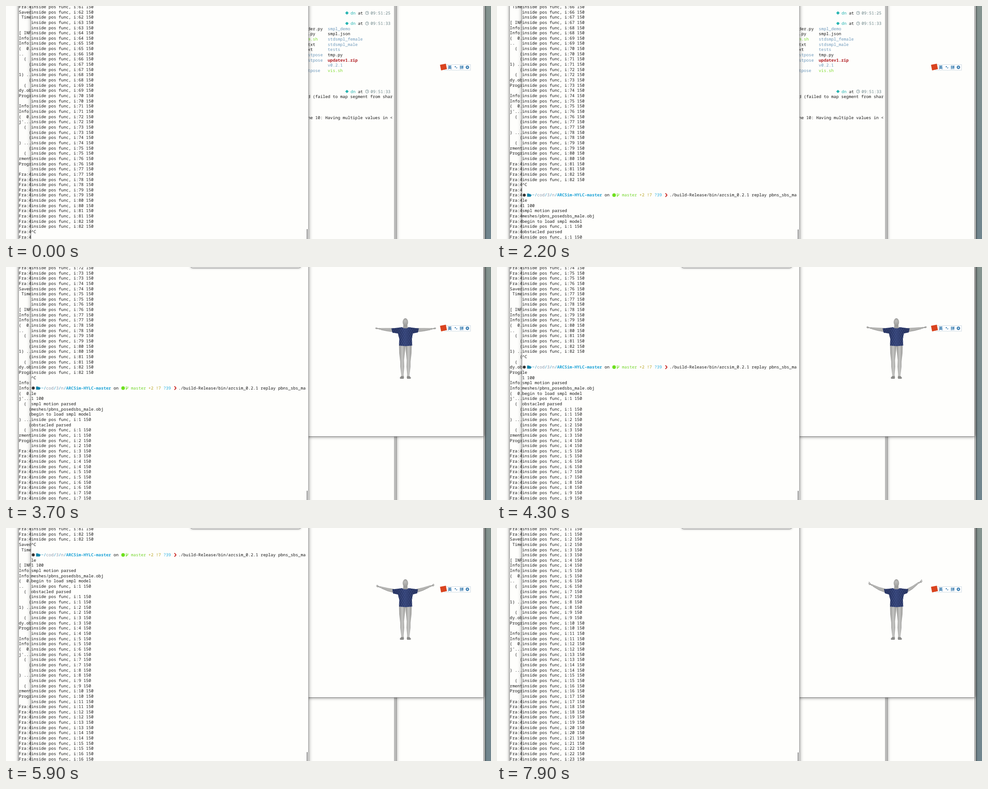
An HTML page with a canvas that plays this animation: 1079x519 px, repeating every 8000 ms.

```html
<!DOCTYPE html>
<html lang="en">
<head>
<meta charset="utf-8">
<title>Terminal replay</title>
<style>
html, body { margin: 0; width: 100%; height: 100%; overflow: hidden; background: #fefefc; }
canvas { display: block; width: 1079px; height: 519px; }
</style>
</head>
<body>
<canvas id="stage" width="1079" height="519"></canvas>
<script>
const ctx = document.getElementById('stage').getContext('2d');
const LOOP = 8000, COL = 5.55, ROW = 11.655, PAPER = '#fefefc', INK = '#161616';
const BLUE = '#6c98bb', GREEN = '#7ddc2c', TEAL = '#24b3b0', SLATE = '#6b8488';
const MONO = '9.25px "Noto Sans Mono", "DejaVu Sans Mono", monospace';

// Times (in 100 ms) at which the front terminal scrolls up one line.
const SCROLLS = [7, 10, 12, 14, 20, 20, 22, 22, 22, 23, 24, 25, 27, 28, 29, 30, 31, 32, 34, 35, 36, 37,
  39, 40, 42, 43, 44, 46, 47, 48, 49, 50, 51, 52, 53, 55, 56, 57, 58, 59,
  60, 61, 63, 64, 66, 68, 70, 71, 72, 73, 75, 76, 79];
const WINDOW_AT = 2400;
// Offset of the log block in the left terminal: [time, rows].
const LEFT_STEPS = [[0, 0], [500, -1], [2200, -2], [2700, 3], [5000, 2], [7200, 1]];
const LEFT_LOG = ['Saved', ' Time', '', '', '[ INF', 'Info:', 'Info:', '(  0.', '..', '  (', '    (', '    (',
  '1) ..', '    (', '  (', 'dy.ob', 'Progr', '', 'Info:', 'Info:', '(  0.', "j'...", '  (', '    (', '    (',
  ') ...', '    (', '  (', 'rment', 'Progr', ''];
const OUTPUT = ['^C', '', null, 'le', '1 100', 'smpl motion parsed', 'meshes/pbns_posedsbs_male.obj',
  'begin to load smpl model', 'inside pos func, i:1 150', 'obstacled parsed'];
const LISTING = [
  ['der.py', INK, 'smpl_demo', BLUE], ['.py', INK, 'smpl.json', INK], ['m.sh', GREEN, 'stdsmpl_female', BLUE],
  ['txt', INK, 'stdsmpl_male', BLUE], ['xt', INK, 'tests', BLUE], ['stpose', BLUE, 'tmp.py', INK],
  ['stpose', BLUE, 'updatev1.zip', '#b01c20', true], ['', INK, 'v0.2.1', BLUE], ['tpose', BLUE, 'vis.sh', GREEN]];

function text(s, x, y, color = INK, bold = false) {
  ctx.font = (bold ? '600 ' : '') + MONO;
  ctx.fillStyle = color;
  for (let i = 0; i < s.length; i++) if (s[i] !== ' ') ctx.fillText(s[i], x + i * COL, y + 3.3);
}

function dot(x, y, r, color) {
  ctx.fillStyle = color;
  ctx.beginPath();
  ctx.arc(x, y, r, 0, 7);
  ctx.fill();
}

function poly(points, fill) {
  ctx.beginPath();
  points.forEach(([x, y]) => ctx.lineTo(x, y));
  ctx.closePath();
  if (fill) { ctx.fillStyle = fill; ctx.fill(); }
}

function line(points, width, color) {
  ctx.beginPath();
  points.forEach(([x, y]) => ctx.lineTo(x, y));
  ctx.lineWidth = width;
  ctx.strokeStyle = color;
  ctx.stroke();
}

function pane(x, y, w, h, blur = 7, radius = 0) {
  ctx.save();
  ctx.shadowColor = 'rgba(0,0,0,.55)';
  ctx.shadowBlur = blur;
  ctx.fillStyle = PAPER;
  ctx.beginPath();
  ctx.roundRect(x, y, w, h, radius);
  ctx.fill();
  ctx.restore();
  ctx.lineWidth = 1;
  ctx.strokeStyle = 'rgba(70,70,70,.5)';
  ctx.stroke();
}

function clock(x, y) {
  ctx.lineWidth = 0.9;
  ctx.strokeStyle = SLATE;
  ctx.beginPath();
  ctx.arc(x, y, 3.6, 0, 7);
  ctx.stroke();
  line([[x, y - 2.3], [x, y], [x + 1.8, y]], 0.8, SLATE);
}

function desktop() {
  const g = ctx.createLinearGradient(0, 0, 0, 519);
  g.addColorStop(0, '#84938f');
  g.addColorStop(1, '#70858e');
  ctx.fillStyle = g;
  ctx.fillRect(1060, 0, 19, 519);
  pane(-20, -20, 1085.5, 560, 4);
  pane(-20, -20, 1082.5, 560, 5);
}

function leftTerminal(t) {
  pane(28, -20, 839.5, 560);
  const offset = LEFT_STEPS.filter(s => s[0] <= t).pop()[1];
  for (let r = 0; r < 45; r++) {
    const s = LEFT_LOG[r - 1 - offset];
    text(s === undefined ? 'Fra:4' : s, 28.6, 1.6 + r * ROW);
  }
}

function rightTerminal() {
  pane(300, -20, 564, 560);
  const x = 671.4, at = k => 3.85 + k * ROW;
  for (const [k, time] of [[1, '09:51:25'], [3, '09:51:33'], [16, '09:51:33']]) {
    const y = at(k);
    for (const [dx, dy] of [[-1.7, 0], [1.7, 0], [0, -1.7], [0, 1.7]]) dot(758.5 + dx, y + dy, 1.7, TEAL);
    text('dn', 766.4, y, TEAL);
    text('at', 783, y);
    clock(803.3, y);
    text(time, 811, y, SLATE);
  }
  LISTING.forEach(([a, ca, b, cb, bold], i) => {
    text(a, x, at(4 + i), ca);
    text(b, x + 8 * COL, at(4 + i), cb, bold);
  });
  text('d (failed to map segment from shar', x, at(17));
  text('ne 10: Having multiple values in <', x, at(21));
}

function prompt(y) {
  const at = (col, s, color, bold) => text(s, 56 + col * COL, y, color, bold);
  dot(60.6, y, 3.3, '#333');
  poly([[67, y - 3.5], [71, y - 3.5], [72, y - 2.5], [75, y - 2.5], [75, y - .8], [77.5, y - .8], [75, y + 3.5], [67, y + 3.5]], '#1787ac');
  at(4, '~/   / / /', '#1c8fc0');
  at(6, 'cod 3 n', '#8a99ad');
  at(14, 'ARCSim-HYLC-master', '#1ba2d6', true);
  at(33, 'on');
  dot(260.5, y, 4, '#6ee01e');
  line([[267.5, y + 4], [267.5, y - 4]], 1.2, '#6ee01e');
  line([[267.5, y + 2], [271, y], [271, y - 3.5]], 1.2, '#6ee01e');
  at(40, 'master', '#72d62a');
  at(47, '+2 !7', '#b9a524');
  at(53, '?39', '#25aee0');
  line([[374.8, y - 4], [378.2, y], [374.8, y + 4]], 1.9, '#c9231f');
  at(59, './build-Release/bin/arcsim_0.2.1 replay pbns_sbs_ma');
}

function mainTerminal(t, top) {
  pane(55.5, -20, 617.5, 560, 9);
  for (let r = 0; r < 45; r++) {
    const i = r - top, y = 1.6 + r * ROW;
    if (i === 2) prompt(y);
    else if (i >= 0 && i < OUTPUT.length) text(OUTPUT[i], 56, y);
    else {
      const n = i < 0 ? 82 - Math.floor((-i - 1) / 2) : i < 12 ? 1 : Math.floor(i / 2) - 4;
      text(`inside pos func, i:${n} 150`, 56, y);
    }
  }
  ctx.fillStyle = '#858585';
  ctx.fillRect(669, 497 + 3 * t / LOOP, 2, 30);
}

function arm(side, p) {
  const left = side < 0;
  const tip = left ? [821 + 5 * p ** 1.3, 140 - 17 * p ** .85] : [957 - 10.5 * p * p, 140 - 22 * p];
  const root = [888 + side * (27 - 3 * p), 140.5 - p];
  const wrist = [tip[0] - side * (13 - 3 * p), tip[1] + 1 + 4 * p];
  const elbow = [(root[0] + wrist[0]) / 2, (root[1] + wrist[1]) / 2 + 1.3 * p];
  const edge = (q, h) => [[q[0], q[1] - h], [q[0], q[1] + h]];
  const [a, b, c] = [edge(root, 4), edge(elbow, 3.2), edge(wrist, 1.7)];
  poly([a[0], b[0], c[0], c[1], b[1], a[1]], '#b3b3b1');
  line([a[1], b[1], c[1]], .8, '#858583');
  line([a[0], b[0], c[0]], .5, '#a0a09e');
  const palm = [(wrist[0] * 2 + tip[0]) / 3, (wrist[1] * 2 + tip[1]) / 3];
  line([wrist, palm], 3.6, '#a9a9a7');
  for (const f of [-1, 0, 1]) {
    const spread = f * (.9 + 2.1 * p);
    line([palm, [tip[0] - side * Math.abs(f) * 1.2, tip[1] + spread]], 1.4, '#a0a09e');
  }
}

function shirt(p) {
  const lx = 857 + 4 * p, rx = 919 - 4 * p, ly = 137 - p;
  ctx.save();
  poly([[881, 134], [885, 136.5], [892, 136.5], [896, 134], [906, 135.5], [rx, ly], [rx - 2, ly + 9], [905, 148],
    [903, 160], [903.5, 175], [889, 176.3], [874.5, 175], [875, 160], [872, 148], [lx + 2, ly + 9.5], [lx, ly], [871, 135.5]], '#465891');
  ctx.clip();
  for (let x = 810; x < 970; x += 4) {
    line([[x, 130], [x + 24, 178]], .8, '#202b58');
    line([[x + 24, 130], [x, 178]], .8, '#202b58');
  }
  const shade = ctx.createLinearGradient(872, 0, 906, 0);
  shade.addColorStop(0, 'rgba(10,15,40,.25)');
  shade.addColorStop(.45, 'rgba(10,15,40,0)');
  shade.addColorStop(1, 'rgba(10,15,40,.25)');
  ctx.fillStyle = shade;
  ctx.fillRect(850, 130, 75, 50);
  ctx.restore();
}

function leg(mirror) {
  const x = dx => 888.5 + mirror * dx;
  const g = ctx.createLinearGradient(x(1), 0, x(14), 0);
  g.addColorStop(0, '#9c9c9a');
  g.addColorStop(.45, '#c6c6c4');
  g.addColorStop(1, '#9a9a98');
  poly([[x(0), 174], [x(14), 174], [x(13.6), 192], [x(11.5), 211], [x(11.5), 222], [x(9), 242], [x(12.5), 247],
    [x(11), 249], [x(4), 249], [x(3.2), 246], [x(4), 240], [x(2.5), 222], [x(3), 208], [x(.7), 185]], g);
  poly([[x(4), 243], [x(9), 243], [x(12.5), 247], [x(11), 249], [x(4), 249], [x(3.2), 246]], '#8d8d8b');
}

function figure(p) {
  leg(-1);
  leg(1);
  arm(-1, p);
  arm(1, p);
  poly([[884, 127], [893, 127], [893.5, 134], [897, 137], [880, 137], [883.5, 134]], '#a3a3a1');
  shirt(p);
  const g = ctx.createRadialGradient(888, 120, 1, 888.5, 123, 10);
  g.addColorStop(0, '#bcbcba');
  g.addColorStop(1, '#929290');
  ctx.fillStyle = g;
  ctx.beginPath();
  ctx.ellipse(888.5, 123, 6, 9, 0, 0, 7);
  ctx.fill();
}

function inputBar() {
  const blue = '#236fa8';
  ctx.fillStyle = '#fff';
  ctx.fillRect(975, 130, 59, 13);
  ctx.lineWidth = 1;
  ctx.strokeStyle = '#cfdbe3';
  ctx.strokeRect(975.5, 130.5, 58, 12.5);
  poly([[965.5, 131], [978.5, 128.5], [981, 140.5], [968, 143.5]], '#d9431e');
  ctx.font = 'bold 9px "Noto Sans CJK SC", "Noto Sans CJK", sans-serif';
  ctx.fillStyle = blue;
  ctx.fillText('英', 982.8, 140.2);
  ctx.fillText('拼', 1009.3, 140.2);
  dot(999.6, 135.2, 1.2, blue);
  line([[1003.2, 136.5], [1002.4, 139]], 1.3, blue);
  for (let i = 0; i < 4; i++) {
    const a = i * Math.PI / 4, x = 4 * Math.cos(a), y = 4 * Math.sin(a);
    line([[1026.5 - x, 136.5 - y], [1026.5 + x, 136.5 + y]], 1.6, blue);
  }
  dot(1026.5, 136.5, 3, blue);
  dot(1026.5, 136.5, 1.4, '#fff');
}

function draw(t) {
  const done = SCROLLS.filter(s => s * 100 <= t);
  const poseTime = done.length ? done[done.length - 1] * 100 : 0;
  ctx.fillStyle = PAPER;
  ctx.fillRect(0, 0, 1079, 519);
  desktop();
  leftTerminal(t);
  rightTerminal();
  if (t >= WINDOW_AT) {
    pane(640, -20, 422.5, 397.5);
    figure(Math.max(0, (poseTime - 2900) / 5000));
  }
  mainTerminal(t, 43 - done.length);
  if (t >= WINDOW_AT) pane(411, -12, 244.5, 13.8, 5, 4);
  inputBar();
}

ctx.textRendering = 'geometricPrecision';
const start = performance.now();
function tick() {
  draw((performance.now() - start) % LOOP);
  requestAnimationFrame(tick);
}
tick();
</script>
</body>
</html>
```
